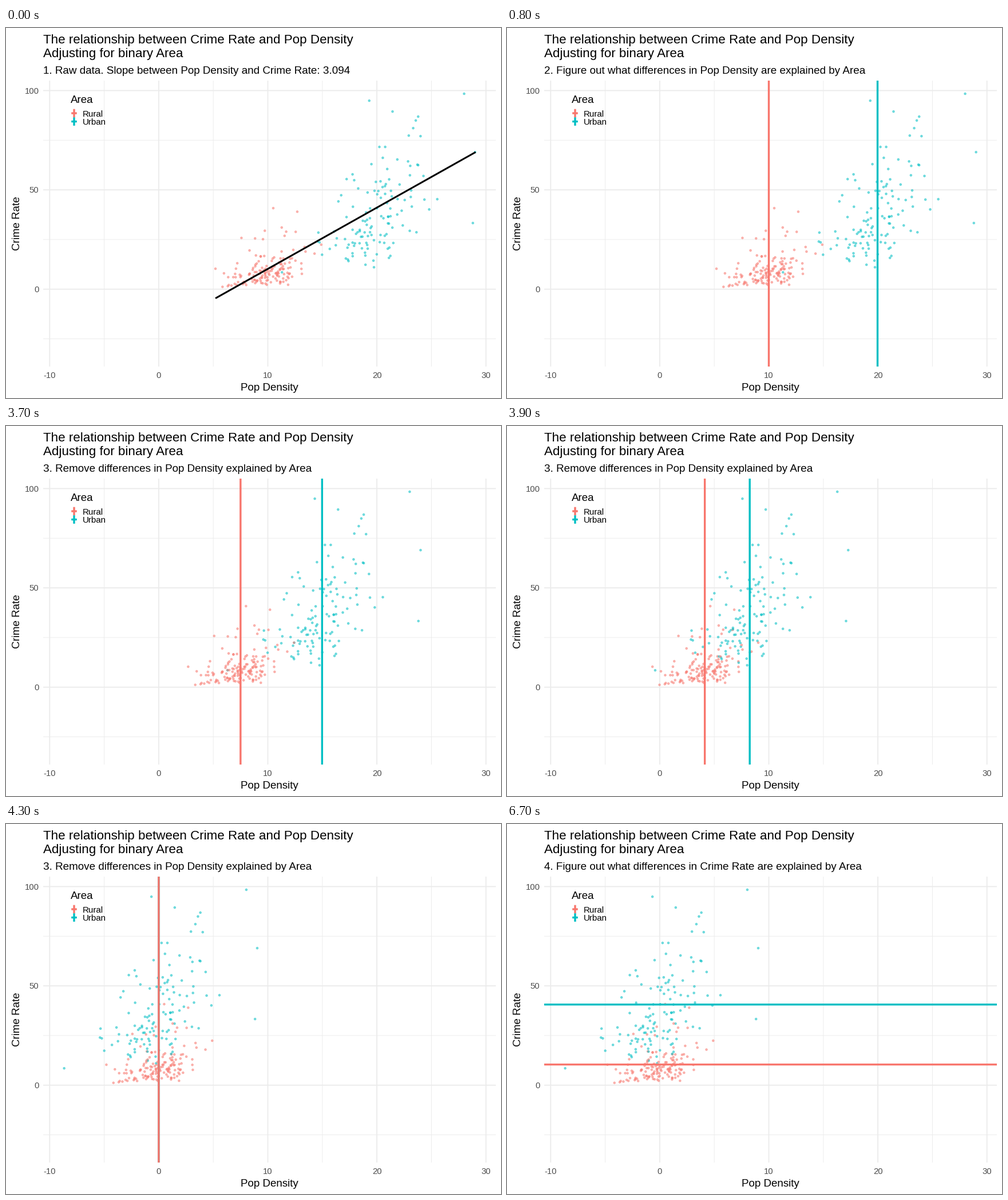
Animation of 865 by 647 pixels, one loop 8000 ms. Source, as a matplotlib script:

```python
import numpy as np
import matplotlib.pyplot as plt
from matplotlib.animation import FuncAnimation

W, H, DPI = 865, 647, 96
PX = 72 / DPI  # points per pixel
LEFT, RIGHT, TOP, BOTTOM = 65, 856, 92.3, 591.7
X0, X_SCALE = 266.9, 19.06
Y0, Y_SCALE = 456.7, 3.473

RURAL, URBAN = "#F8766D", "#00BFC4"
GRID, TICK = "#EBEBEB", "#4D4D4D"
POP_MEAN = {RURAL: 10.0, URBAN: 19.97}
CRIME_MEAN = {RURAL: 10.4, URBAN: 40.6}
FRAMES, INTERVAL = 80, 100
LINE = 3.4 * PX

SUBTITLES = [
    (64, "4. Figure out what differences in Crime Rate are explained by Area"),
    (35, "3. Remove differences in Pop Density explained by Area"),
    (5, "2. Figure out what differences in Pop Density are explained by Area"),
    (0, "1. Raw data. Slope between Pop Density and Crime Rate: 3.094"),
]


def cloud(rng, count, pop, spread, crime, growth, noise, x_range, y_range, extremes):
    """Normal density; crime grows exponentially with it, with lognormal noise."""
    x = rng.normal(pop, spread, 4 * count)
    y = crime * np.exp(growth * (x - pop) + rng.normal(0, noise, x.size))
    inside = ((x > x_range[0]) & (x < x_range[1])
              & (y > y_range[0]) & (y < y_range[1]))
    core = np.column_stack([x, y])[inside][:count]
    return np.vstack([core, extremes])


def make_data():
    rng = np.random.default_rng(12)
    rural = cloud(rng, 145, 10, 1.9, 8.4, 0.17, 0.65, (5.4, 14.5), (1, 33),
                  [(5.2, 10.3), (10.5, 40.8), (12.7, 39), (14.9, 22.4)])
    urban = cloud(rng, 126, 20, 2.5, 36, 0.11, 0.45, (12.4, 26.6), (9.5, 90),
                  [(11.3, 8.5), (19.3, 94.9), (28, 98.4), (29, 69), (28.8, 33.3)])
    points = np.vstack([rural, urban])
    colors = np.array([RURAL] * len(rural) + [URBAN] * len(urban))
    order = rng.permutation(len(points))
    return points[order], colors[order]


def ease(t):
    return (1 - np.cos(np.pi * np.clip(t, 0, 1))) / 2


plt.rcParams["font.family"] = "Liberation Sans"
fig = plt.figure(figsize=(W / DPI, H / DPI), dpi=DPI, facecolor="white")
ax = fig.add_axes([LEFT / W, 1 - BOTTOM / H,
                   (RIGHT - LEFT) / W, (BOTTOM - TOP) / H])
ax.axis("off")
ax.set_xlim((LEFT - X0) / X_SCALE, (RIGHT - X0) / X_SCALE)
ax.set_ylim((Y0 - BOTTOM) / Y_SCALE, (Y0 - TOP) / Y_SCALE)


def label(x, y, text, size, **style):
    style = {"va": "baseline", "color": "black", **style}
    return fig.text(x / W, 1 - y / H, text, fontsize=size, **style)


def draw_grid():
    for x in range(-10, 31, 5):
        major = x % 10 == 0
        ax.axvline(x, color=GRID, lw=(1.8 if major else 0.9) * PX,
                   zorder=major, snap=False)
        if major:
            label(X0 + x * X_SCALE, 611.5, str(x), 11.2, ha="center", color=TICK)
    for y in range(-25, 101, 25):
        major = y % 50 == 0
        ax.axhline(y, color=GRID, lw=(1.8 if major else 0.9) * PX,
                   zorder=major, snap=False)
        if major:
            label(57.5, Y0 - y * Y_SCALE + 5.3, str(y), 11.2, ha="right", color=TICK)


def draw_legend():
    label(113, 131, "Area", 14.1)
    for color, name, y in [(RURAL, "Rural", 149), (URBAN, "Urban", 163.5)]:
        for dx, dy in [(0, 7.3), (4.8, 0)]:
            xs = (np.array([119 - dx, 119 + dx]) - X0) / X_SCALE
            ys = (Y0 - np.array([y - dy, y + dy])) / Y_SCALE
            ax.plot(xs, ys, color=color, lw=LINE, zorder=6,
                    solid_capstyle="butt", snap=False)
        label(133.5, y + 6, name, 11.3)


draw_grid()
draw_legend()
label(65, 27, "The relationship between Crime Rate and Pop Density", 16.8)
label(65, 51.5, "Adjusting for binary Area", 16.8)
label(460, 634, "Pop Density", 14.1, ha="center")
label(24, 342, "Crime Rate", 14.1, ha="right", va="center", rotation=90,
      rotation_mode="anchor").set(ha="center", va="baseline")
subtitle = label(65, 80, "", 14.13)

points, colors = make_data()
offsets = np.array([POP_MEAN[c] for c in colors])
dots = ax.scatter(points[:, 0], points[:, 1], s=(3.5 * PX) ** 2, c=colors,
                  edgecolors=colors, linewidths=1 * PX, alpha=0.5, zorder=3)
fit, = ax.plot([5.2, 29.05], [-4.6, 69], color="black", lw=3 * PX, zorder=5,
               solid_capstyle="butt")
pop_lines = {c: ax.axvline(m, color=c, lw=LINE, zorder=4 + (c == RURAL), snap=False)
             for c, m in POP_MEAN.items()}
crime_lines = [ax.axhline(m, color=c, lw=LINE, zorder=4, snap=False)
               for c, m in CRIME_MEAN.items()]


def update(frame):
    subtitle.set_text(next(s for start, s in SUBTITLES if frame >= start))
    fit.set_alpha(1 - ease((frame - 4) / 4))
    shift = ease((frame - 34) / 9)
    dots.set_offsets(np.column_stack([points[:, 0] - shift * offsets,
                                      points[:, 1]]))
    for color, line in pop_lines.items():
        line.set_xdata([POP_MEAN[color] * (1 - shift)] * 2)
        line.set_visible(8 <= frame < 64)
    for line in crime_lines:
        line.set_visible(frame >= 67)
    return [subtitle, fit, dots, *pop_lines.values(), *crime_lines]


animation = FuncAnimation(fig, update, frames=FRAMES, interval=INTERVAL,
                          repeat=True, repeat_delay=0, blit=False)
plt.show()
```
